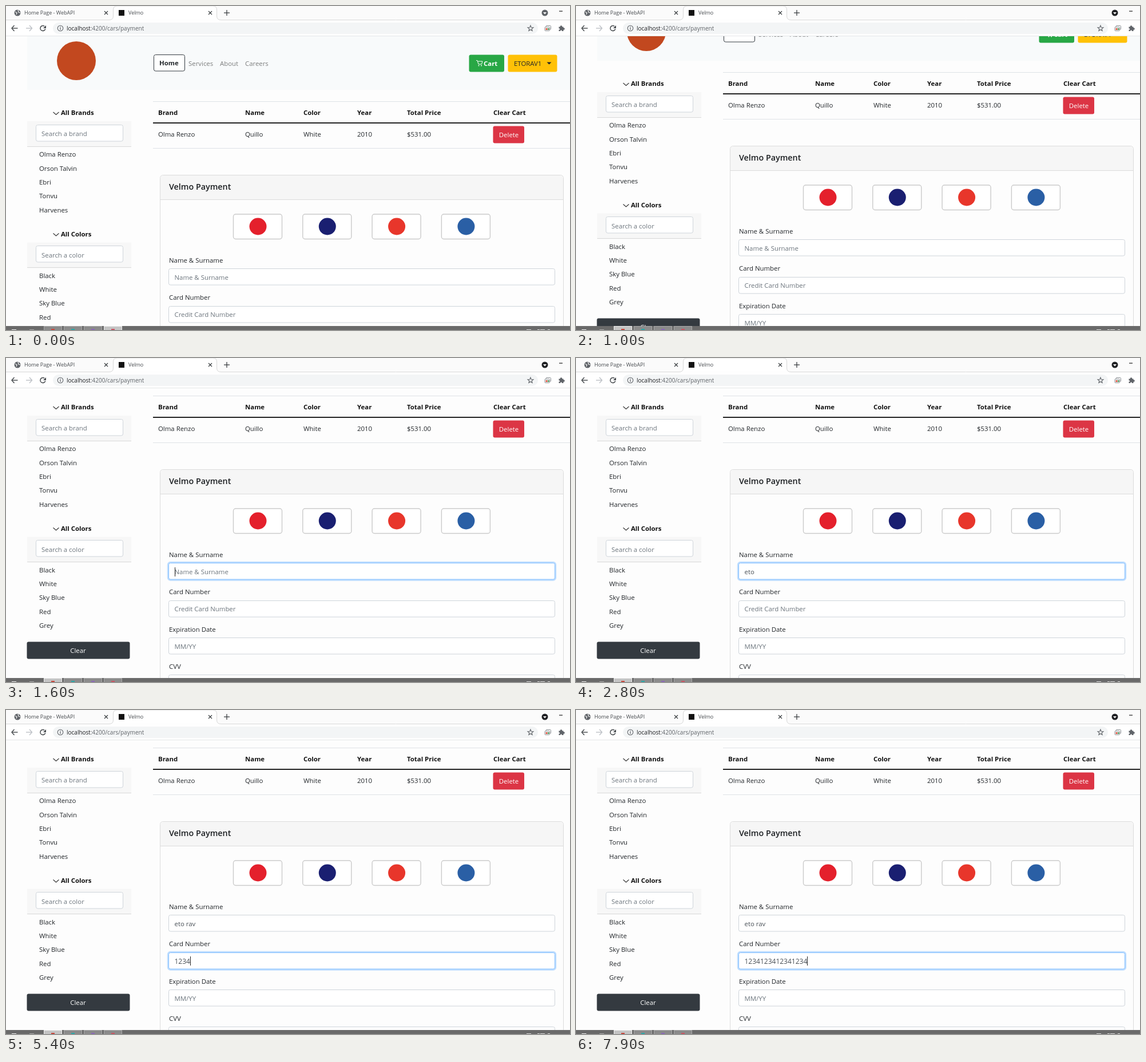
These frames come from a looping animation (986 by 568 pixels, 8 s). An HTML page with a canvas:

```html
<!DOCTYPE html>
<html lang="en">
<head>
<meta charset="utf-8">
<title>Velmo</title>
<style>
html, body { margin: 0; width: 986px; height: 568px; overflow: hidden; background: #fdfdfd; }
canvas { display: block; width: 986px; height: 568px; }
</style>
</head>
<body>
<canvas id="stage"></canvas>
<script>
const W = 986, H = 568, LOOP = 8000;
const canvas = document.getElementById('stage');
const c = canvas.getContext('2d');
const dpr = window.devicePixelRatio || 1;
canvas.width = W * dpr;
canvas.height = H * dpr;

const FONT = '"Open Sans", "Noto Sans", sans-serif';
const INK = '#212529', MUTED = '#6c757d', LINE = '#dee2e6', ICON = '#5f6368';

const nameText = 'eto rav';
const nameKeys = [1800, 2000, 2100, 2300, 3500, 3700, 4000];
const cardText = '1234'.repeat(4);
const cardKeys = [4900, 5000, 5200, 5400, 5600, 5700, 5800, 6000,
  6100, 6200, 6300, 6500, 6600, 6700, 6800, 7000];
const caretOff = [[2800, 3300], [7400, 7900]];

const typed = (s, keys, t) => s.slice(0, keys.filter(k => k <= t).length);

function text(s, x, mid, color = INK, { size = 11.4, weight = 400, align = 'left' } = {}) {
  c.font = `${weight} ${size}px ${FONT}`;
  c.textAlign = align;
  c.fillStyle = color;
  c.fillText(s, x, mid + size * 0.36);
  return c.measureText(s).width;
}

const bold = (s, x, mid, color = '#111') => text(s, x, mid, color, { weight: 700 });

function rect(x, y, w, h, color) {
  c.fillStyle = color;
  c.fillRect(x, y, w, h);
}

function round(x, y, w, h, r, fill, stroke, lw = 1) {
  c.beginPath();
  c.roundRect(x, y, w, h, r);
  if (fill) { c.fillStyle = fill; c.fill(); }
  if (stroke) { c.strokeStyle = stroke; c.lineWidth = lw; c.stroke(); }
}

function path(points, color, lw = 1, close = false) {
  c.beginPath();
  points.forEach(([x, y]) => c.lineTo(x, y));
  if (close) c.closePath();
  c.strokeStyle = color;
  c.lineWidth = lw;
  c.stroke();
}

function disc(x, y, r, color) {
  c.beginPath();
  c.arc(x, y, r, 0, 7);
  c.fillStyle = color;
  c.fill();
}

function ring(x, y, r, color, lw = 1, from = 0, to = Math.PI * 2) {
  c.beginPath();
  c.arc(x, y, r, from, to);
  c.strokeStyle = color;
  c.lineWidth = lw;
  c.stroke();
}

function cross(x, y) {
  path([[x - 3, y - 3], [x + 3, y + 3]], '#3c4043', 1.2);
  path([[x + 3, y - 3], [x - 3, y + 3]], '#3c4043', 1.2);
}

function arrow(x, y, dir, color) {
  path([[x - 5, y], [x + 5, y]], color, 1.4);
  path([[x + dir, y - 5], [x + dir * 5.5, y], [x + dir, y + 5]], color, 1.4);
}

function tab() {
  c.beginPath();
  c.moveTo(-1, 24.5);
  c.lineTo(180, 24.5);
  c.quadraticCurveTo(187.5, 24.5, 187.5, 18);
  c.lineTo(187.5, 7);
  c.quadraticCurveTo(187.5, 0, 194, 0);
  c.lineTo(362, 0);
  c.quadraticCurveTo(368.5, 0, 368.5, 7);
  c.lineTo(368.5, 18);
  c.quadraticCurveTo(368.5, 24.5, 376, 24.5);
  c.lineTo(W + 1, 24.5);
  c.fillStyle = '#fff';
  c.fill();
  c.strokeStyle = '#d8d8d8';
  c.lineWidth = 1;
  c.stroke();
}

function browser(active) {
  rect(0, 0, W, 25, '#fbfbfb');
  rect(0, 25, W, 28, '#fff');
  tab();
  rect(0, 52, W, 1, '#e4e6e8');

  disc(20, 12, 5.5, ICON);
  path([[16, 10], [19, 12], [18, 15]], '#eee', 1.3);
  path([[21, 7], [22, 11], [25, 12]], '#eee', 1.3);
  text('Home Page - WebAPI', 32, 12, '#45494d', { size: 9 });
  cross(175, 12);
  rect(197, 7, 10, 10, '#111');
  text('Velmo', 214, 12, '#45494d', { size: 9 });
  cross(357, 12);
  path([[381, 12], [391, 12]], '#3c4043', 1.3);
  path([[386, 7], [386, 17]], '#3c4043', 1.3);

  disc(942, 12, 5.5, active ? '#202124' : ICON);
  c.beginPath();
  c.moveTo(939, 11); c.lineTo(945, 11); c.lineTo(942, 14.5);
  c.fillStyle = '#fff';
  c.fill();
  rect(967, 8.5, 6, 1.2, '#222');

  arrow(15.5, 39, -1, '#45494d');
  arrow(40, 39, 1, '#bdc1c6');
  ring(64.5, 39, 4.5, '#45494d', 1.5, 0.3, 5.4);
  c.beginPath();
  c.moveTo(70, 34); c.lineTo(70, 39); c.lineTo(65, 39);
  c.fillStyle = '#45494d';
  c.fill();

  round(82, 29, 848, 20, 10, '#f3f5f6');
  ring(95, 39, 4.8, ICON, 1.1);
  rect(94.4, 38.3, 1.3, 3.4, ICON);
  rect(94.4, 36.2, 1.3, 1.3, ICON);
  const host = text('localhost', 106, 39, '#202124', { size: 10 });
  text(':4200/cars/payment', 106 + host, 39, ICON, { size: 10 });

  const star = [...Array(10).keys()].map(i => {
    const r = i % 2 ? 2.2 : 5.2, a = i * Math.PI / 5 - Math.PI / 2;
    return [917 + r * Math.cos(a), 39.3 + r * Math.sin(a)];
  });
  path(star, ICON, 1.1, true);
  round(944, 34.5, 8.5, 6.5, 1, '#fff', '#8a8f94');
  round(942, 37, 8.5, 6.5, 1, '#fff', '#8a8f94');
  rect(943.5, 39, 3, 3, '#d95040');
  rect(947, 39, 2.5, 3, '#4a9b5b');
  rect(966.5, 36.5, 8, 7.5, ICON);
  disc(970.5, 36, 1.8, ICON);
  disc(975, 40, 1.8, ICON);
  disc(967, 40.5, 1.2, '#fff');
  disc(970.5, 43.5, 1.2, '#fff');
}

function taskbar(active) {
  rect(0, 561, W, 7, '#6a6a6a');
  rect(10, 567, 8, 1, '#f2f2f2');
  rect(41, 567, 8, 1, '#aaa');
  ['#c6473c', '#2ba5a5', '#8a68b5', '#c75462'].forEach((color, i) => {
    const x = 66 + i * 35, on = i === (active ? 0 : 3);
    rect(x, 561, 32, 7, on ? '#c4c4c4' : '#8b8b8b');
    path([[x + .5, 568], [x + .5, 561.5], [x + 31.5, 561.5], [x + 31.5, 568]], on ? '#eee' : '#a8a8a8');
    rect(x + 13, 566, 6, 2, color);
  });
  [910, 929, 934, 947].forEach((x, i) => rect(x, 567, i % 2 ? 4 : 8, 1, '#ddd'));
}

function navbar() {
  rect(37, 53, W - 37, 94, '#f8fafb');
  disc(123, 96, 34, '#c2481f');
  round(258.5, 85.5, 54, 28.5, 3, '#fff', '#343a40');
  bold('Home', 268, 100, INK);
  [['Services', 319], ['About', 374], ['Careers', 418]]
    .forEach(([s, x]) => text(s, x, 101, '#7c7d7d'));

  round(809.5, 85.5, 61.5, 30, 3, '#28a745');
  path([[822, 95.5], [824, 95.5], [826, 102], [831.5, 102], [833, 97], [824.5, 97]], '#fff');
  disc(826.5, 104.5, 1, '#fff');
  disc(831, 104.5, 1, '#fff');
  bold('Cart', 835, 101, '#fff');
  round(877.5, 85.5, 86, 30, 3, '#ffc107');
  text('ETORAV1', 888, 101);
  c.beginPath();
  c.moveTo(945.5, 98.5); c.lineTo(953.5, 98.5); c.lineTo(949.5, 102.5);
  c.fillStyle = INK;
  c.fill();
}

function filter(title, hint, items, y) {
  path([[82.5, y - 1], [87.5, y + 3.5], [92.5, y - 1]], '#333', 1.1);
  bold(title, 96, y);
  rect(37, y + 15, 182, 45, '#f7f7f7');
  rect(37, Math.floor(y + 59), 182, 1, '#d9d9d9');
  field(52.5, Math.floor(y + 21) + 0.5, 152);
  text(hint, 62, y + 37, MUTED);
  items.forEach((s, i) => text(s, 58, y + 73 + i * 24.4));
}

function field(x, y, w, focus) {
  if (focus) round(x - 1.2, y - 1.2, w + 2.4, 30.9, 4, null, '#bfdeff', 3);
  round(x, y, w, 28.5, 3, '#fff', focus ? '#80bdff' : '#ced4da');
}

function input(label, hint, i, value, focus, caret) {
  const y = 446 + i * 65.3;
  text(label, 285, y);
  field(284.5, Math.floor(y + 14.8) + 0.5, 675, focus);
  // digits run a touch wider than letters in this form
  const size = /^\d/.test(value) ? 12 : 11.4;
  const w = value ? text(value, 294.5, y + 30, '#495057', { size })
                  : (text(hint, 294.5, y + 30, MUTED), 0);
  if (focus && caret) rect(Math.round(294.5 + w), Math.round(y + 21.5), 1, 16, '#222');
}

function table() {
  const cols = [266, 418, 520, 614, 701, 852];
  rect(257, 167, W - 257, 1, LINE);
  rect(257, 204, W - 257, 2, '#222');
  rect(257, 249, W - 257, 1, LINE);
  ['Brand', 'Name', 'Color', 'Year', 'Total Price', 'Clear Cart']
    .forEach((s, i) => bold(s, cols[i], 187));
  ['Olma Renzo', 'Quillo', 'White', '2010', '$531.00']
    .forEach((s, i) => text(s, cols[i], 225));
  round(851.5, 210.5, 54.5, 30, 3, '#dc3545');
  text('Delete', 879, 226, '#fff', { align: 'center' });
}

function payment(t) {
  round(269.5, 296.5, 705, 460, 5, '#fdfdfd', '#dcdcdc');
  round(270, 297, 704, 42, [5, 5, 0, 0], '#f6f6f6');
  rect(270, 339, 704, 1, '#dcdcdc');
  text('Velmo Payment', 285, 317, '#1b1e21', { size: 14.3, weight: 600 });

  ['#e4202c', '#1a1f71', '#e8362b', '#2a5fa5'].forEach((color, i) => {
    const x = 397.5 + i * 121.3;
    round(x, 365, 85, 43.5, 4, '#fff', '#cbcbcb', 1.4);
    disc(x + 43, 386.5, 15, color);
  });

  const caret = !caretOff.some(([a, b]) => t >= a && t < b);
  input('Name & Surname', 'Name & Surname', 0, typed(nameText, nameKeys, t), t >= 1600 && t < 4400, caret);
  input('Card Number', 'Credit Card Number', 1, typed(cardText, cardKeys, t), t >= 4400, caret);
  input('Expiration Date', 'MM/YY', 2, '');
  input('CVV', 'CVV', 3, '');
}

function page(t) {
  const scroll = t < 1000 ? 0 : t < 1100 ? 51 : 101;
  c.save();
  c.beginPath();
  c.rect(0, 53, W, 508);
  c.clip();
  c.translate(0, -scroll);
  navbar();
  filter('All Brands', 'Search a brand',
    ['Olma Renzo', 'Orson Talvin', 'Ebri', 'Tonvu', 'Harvenes'], 187);
  filter('All Colors', 'Search a color',
    ['Black', 'White', 'Sky Blue', 'Red', 'Grey'], 399.5);
  round(36.5, 598.5, 180, 30, 3, '#343a40');
  text('Clear', 126, 614, '#fff', { align: 'center' });
  table();
  payment(t);
  c.restore();
}

function draw(t) {
  c.setTransform(dpr, 0, 0, dpr, 0, 0);
  rect(0, 0, W, H, '#fdfdfd');
  page(t);
  browser(t >= 700);
  taskbar(t >= 700);
}

const start = performance.now();
function tick() {
  draw((performance.now() - start) % LOOP);
  requestAnimationFrame(tick);
}
tick();
</script>
</body>
</html>
```
